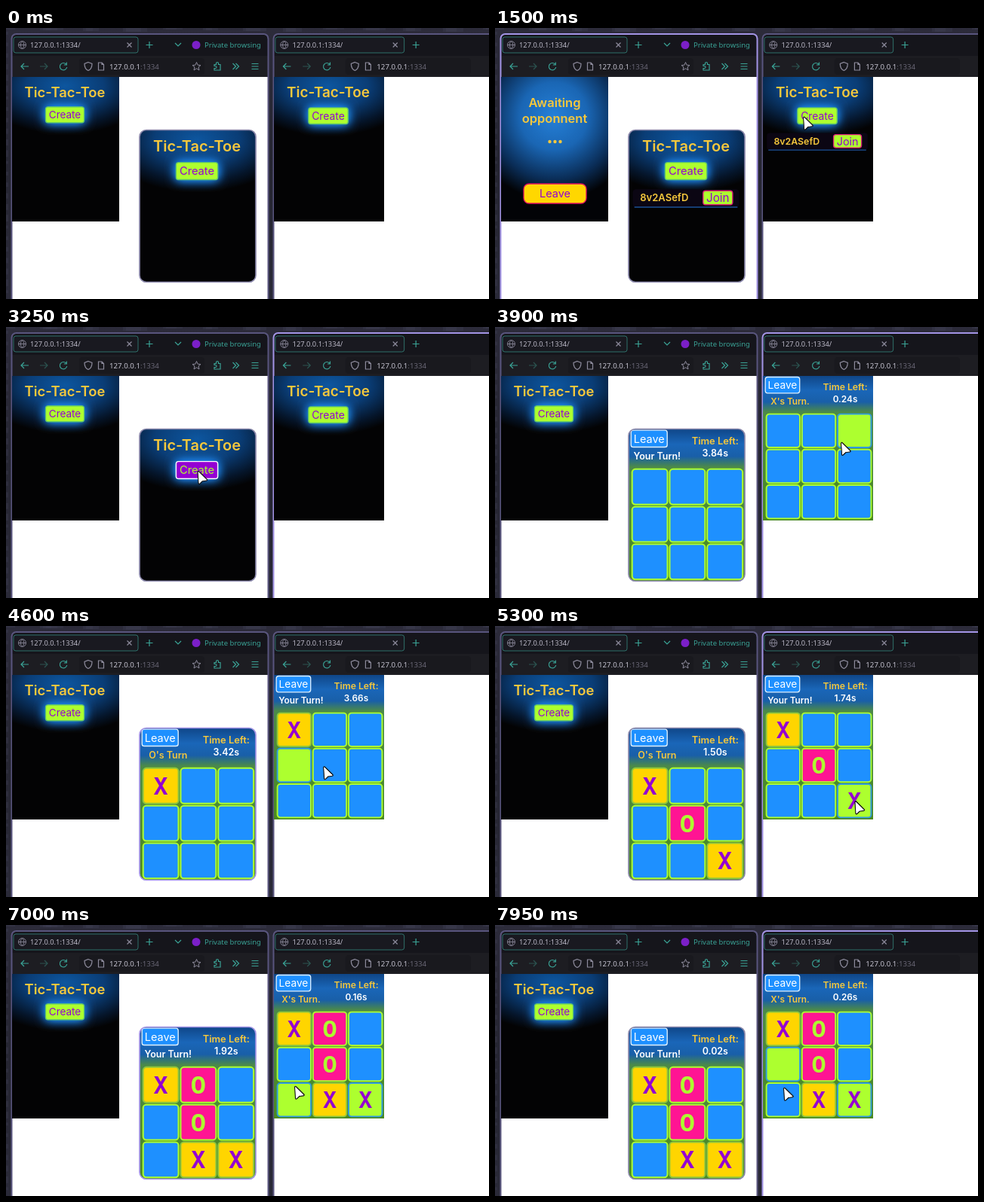
Write an HTML page with a canvas that moves like this. It is 640 px wide and 360 px high and loops after 8000 ms.

```html
<!DOCTYPE html>
<html lang="en">
<head>
<meta charset="utf-8">
<title>Tic-Tac-Toe</title>
<style>
html, body { margin: 0; width: 100%; height: 100%; overflow: hidden; background: #22222e; }
canvas { display: block; width: 640px; height: 360px; }
</style>
</head>
<body>
<canvas id="stage"></canvas>
<script>
const LOOP = 8000, TRAVEL = 350, PRESS = 100, HOVER_LAG = 50, NET_LAG = 120;
const GOLD = '#f6c83c', LIME = '#adff2f', BLUE = '#1e90ff', VIOLET = '#9400d3', TEAL = '#3aa396';
const LILAC = '#a394e6';
const UI = '"Noto Sans", sans-serif', GAME = 'Inter, sans-serif', MARK = '"Noto Sans Mono", monospace';
const CELL = 47.2;

const canvas = document.getElementById('stage');
const ctx = canvas.getContext('2d');
const dpr = window.devicePixelRatio || 1;
canvas.width = 640 * dpr;
canvas.height = 360 * dpr;

const PANELS = {
  left: { x: 8, y: 65, w: 142, h: 192 },
  right: { x: 355, y: 65, w: 146, h: 192 },
  popup: { x: 177, y: 135.5, w: 154, h: 202 }
};
const ROOM_IDS = { left: '8v2ASefD', popup: 'Kq4ZtW1m' };

// Pointer stops: arrival time, panel, target; "look" stops do not click
const STOPS = [
  [800, 'left', 'create'], [1550, 'right', 'create', 'look'], [1800, 'right', 'join'], [2450, 'right', 'leave'],
  [3255, 'popup', 'create'], [3720, 'right', 'join'],
  [4210, 'popup', 0], [4640, 'right', 4], [4950, 'popup', 8], [5200, 'right', 8],
  [5545, 'right', 1], [5860, 'popup', 7],
  [6600, 'right', 6, 'look'], [7200, 'right', 3], [8090, 'right', 6, 'look']
].map(([at, panel, target, look]) => ({ at, panel, target, click: !look, ...locate(panel, target) }));
STOPS.unshift({ at: 350, x: 330, y: 330 });

let now = 0, hover = null, state;

function view(name, playing) {
  const p = PANELS[name];
  if (!playing) return { x: p.x + p.w / 2 - 1, y: p.y, k: p.w / 142 };
  const k = p.w / 146;
  return { x: p.x + 3, y: p.y + 49 * k, k };
}

function locate(name, target) {
  const spots = { create: [0, 51], join: [39, 83], leave: [23, -37] };
  const [sx, sy] = spots[target] || [(target % 3 + 0.5) * CELL, (Math.floor(target / 3) + 0.5) * CELL];
  const v = view(name, !(target === 'create' || target === 'join'));
  return { x: v.x + sx * v.k, y: v.y + sy * v.k };
}

function pointer(t) {
  if (t < STOPS[0].at + PRESS) return null;
  const i = STOPS.findIndex(s => s.at > t);
  const a = STOPS[i - 1], b = STOPS[i];
  const start = Math.max(a.at + PRESS, b.at - TRAVEL);
  const u = Math.max(0, (t - start) / (b.at - start)), e = u * u * (3 - 2 * u);
  return { x: a.x + (b.x - a.x) * e, y: a.y + (b.y - a.y) * e };
}

// Replays every click up to time t
function simulate(t) {
  const s = { screen: { left: 'lobby', right: 'lobby', popup: 'lobby' }, host: null, board: [], moves: 0, denied: {}, since: 0 };
  for (const { at, panel, target, click } of STOPS) {
    if (!click || at > t) continue;
    s.focus = panel;
    const time = at + PRESS;
    if (time > t) continue;
    if (target === 'create') {
      s.host = panel;
      s.screen[panel] = 'wait';
    } else if (target === 'join') {
      s.screen[s.host] = s.screen[panel] = 'game';
      s.host = null;
      s.since = time;
    } else if (target === 'leave') {
      s.screen.left = s.screen.right = 'lobby';
    } else if (s.board[target]) {
      s.denied[panel + target] = true;
    } else if (panel === (turnOf(s) === 'X' ? 'popup' : 'right')) {
      s.board[target] = turnOf(s);
      s.moves++;
      s.since = time;
    }
  }
  return s;
}

const turnOf = s => Math.min(s.moves, 4) % 2 ? 'O' : 'X';

function timeLeft(t) {
  const s = simulate(t), limit = s.moves < 2 ? 4 : 2;
  return limit - ((t - s.since) / 500) % limit;
}

function isHot(x, y, w, h) {
  if (!hover) return false;
  const p = ctx.getTransform().inverse().transformPoint(new DOMPoint(hover.x * dpr, hover.y * dpr));
  return p.x > x && p.x < x + w && p.y > y && p.y < y + h;
}

function box(x, y, w, h, r, fill, stroke, width = 1) {
  ctx.beginPath();
  ctx.roundRect(x, y, w, h, r);
  if (fill) { ctx.fillStyle = fill; ctx.fill(); }
  if (stroke) { ctx.strokeStyle = stroke; ctx.lineWidth = width; ctx.stroke(); }
}

function dot(x, y, r, color) {
  ctx.fillStyle = color;
  ctx.beginPath();
  ctx.arc(x, y, r, 0, 7);
  ctx.fill();
}

function text(str, x, y, size, color, font = GAME, weight = 400, align = 'center') {
  ctx.font = `${weight} ${size}px ${font}`;
  ctx.textAlign = align;
  ctx.fillStyle = color;
  ctx.fillText(str, x, y);
}

function line(d, x, y, color = TEAL, width = 1.2) {
  ctx.save();
  ctx.translate(x, y);
  ctx.strokeStyle = color;
  ctx.lineWidth = width;
  ctx.stroke(new Path2D(d));
  ctx.restore();
}

function gradient(stops, ...area) {
  const g = area.length === 4 ? ctx.createLinearGradient(...area) : ctx.createRadialGradient(...area);
  stops.forEach(([at, color]) => g.addColorStop(at, color));
  return g;
}

function button(label, x, y, w, h, size, { fill = LIME, color = VIOLET, border, r = 3, glow }) {
  const hot = isHot(x, y, w, h);
  ctx.save();
  if (glow) { ctx.shadowColor = BLUE; ctx.shadowBlur = 14 * dpr; }
  box(x, y, w, h, r, hot ? VIOLET : fill);
  if (glow) ctx.fill();
  ctx.restore();
  box(x, y, w, h, r, null, hot ? '#fff' : border, 1.3);
  text(label, x + w / 2, y + h / 2 + size * 0.36, size, hot ? LIME : color);
}

function lobby() {
  ctx.fillStyle = '#030304';
  ctx.fillRect(-80, 0, 160, 200);
  ctx.save();
  ctx.scale(1.8, 1);
  ctx.fillStyle = gradient([[0, '#0d569f'], [0.45, '#0a3d76'], [0.8, '#05152a'], [1, '#05152a00']], 0, 12, 0, 0, 12, 64);
  ctx.fillRect(-80, 0, 160, 90);
  ctx.restore();
  text('Tic-Tac-Toe', 0, 26.6, 18.4, GOLD, GAME, 600);
  button('Create', -25.5, 39.8, 51, 21, 13.5, { border: '#5fc46a', glow: true });
  if (!state.host) return;
  box(-65, 72.5, 130, 22, 4, '#0b0613');
  line('M-63 94.5H63', 0, 0, '#1a5096', 1.3);
  text(ROOM_IDS[state.host], -56, 87.5, 12, GOLD, GAME, 600, 'left');
  button('Join', 21, 74.5, 36, 17, 14, { border: '#dc1e78' });
}

function waiting() {
  ctx.fillStyle = gradient([[0, '#2580d8'], [0.4, '#1a66b4'], [0.75, '#0a2d57'], [1, '#020306']], 0, 52, 0, 0, 52, 112);
  ctx.fillRect(-80, 0, 160, 205);
  text('Awaiting', 1, 40, 16.5, GOLD, GAME, 600);
  text('opponnent', 1, 61, 16.5, GOLD, GAME, 600);
  for (let i = -1; i < 2; i++) dot(1.5 + i * 7, 86, 2.2, GOLD);
  button('Leave', -40, 142, 83, 26, 14.5, { fill: '#ffd700', border: '#e01060', r: 7 });
}

function cellColors(mark, hot) {
  if (hot) return [LIME, '#2f9be0'];
  if (mark === 'X') return ['#ffd500', '#8fc63c'];
  return [mark ? '#ff1493' : BLUE, LIME];
}

function game(name) {
  const mine = name === 'right' ? 'O' : 'X', turn = turnOf(state), own = turn === mine;
  const left = timeLeft(name === 'right' ? Math.max(now - NET_LAG, state.since ? 0 : now) : now);

  ctx.fillStyle = gradient([[0, '#0f4688'], [0.1, '#1a66b8'], [0.18, '#195fa8'], [0.25, '#4c8a48'], [1, '#4a8a20']], 0, -49, 0, 143);
  ctx.fillRect(-4, -54, 154, 202);
  button('Leave', 0.2, -47.5, 45.5, 21.3, 13.7, { fill: BLUE, border: '#dff0ff', color: '#fff' });
  text('Time Left:', 106, -29.8, 12.2, GOLD, GAME, 600);
  text(left.toFixed(2) + 's', 106, -14.3, 11.8, '#fff', GAME, 600);
  const label = own ? 'Your Turn!' : `${turn}'s Turn${mine === 'O' ? '.' : ''}`;
  text(label, 33, -10.8, 11.8, own ? '#fff' : GOLD, GAME, 600);

  for (let i = 0; i < 9; i++) {
    const x = 1.6 + (i % 3) * CELL, y = 1.6 + Math.floor(i / 3) * CELL, size = CELL - 2.8;
    const mark = state.board[i];
    const [fill, border] = cellColors(mark, isHot(x, y, size, size) || state.denied[name + i]);
    box(x, y, size, size, 4, fill, border, 1.9);
    if (mark) text(mark, x + size / 2, y + 33.2, 31, mark === 'X' ? VIOLET : LIME, MARK, 600);
  }
}

function panel(name) {
  const p = PANELS[name], screen = state.screen[name], v = view(name, screen === 'game');
  ctx.save();
  ctx.beginPath();
  ctx.roundRect(p.x, p.y, p.w, p.h, name === 'popup' ? 9 : 0);
  ctx.clip();
  ctx.translate(v.x, v.y);
  ctx.scale(v.k, v.k);
  ({ lobby, wait: waiting, game })[screen](name);
  ctx.restore();
}

function browser(x, w, focused, at, full) {
  box(x, 8.5, w, 370, 6, '#fff');
  box(x, 8.5, w, 56.5, [6, 6, 0, 0], '#15151b');
  ctx.fillStyle = '#1d1d22';
  ctx.fillRect(x, 37, w, 28);
  const tab = at(10), shift = full ? 0 : 3;
  box(at(97) + shift, 40, 166, 22, 4, '#19191e');
  box(tab, 12, at(175) - tab, 21, 3, '#191920', '#2f716b');
  const gray = '#8d8b9c', dim = '#2c5450';
  line('M-5 0A5 5 0 1 0 5 0A5 5 0 1 0-5 0H5M0-5C-3-2-3 2 0 5C3 2 3-2 0-5', at(21.5), 22.5, gray, 0.9);
  text('127.0.0.1:1334/', at(32), 26, 9.3, '#bab8c6', UI, 400, 'left');
  line('M-3-3L3 3M3-3L-3 3', at(163.5), 22.5, gray);
  line('M-4.5 0H4.5M0-4.5V4.5', at(190), 22.5);
  line('M5 0H-5M-1-4L-5 0L-1 4', at(25), 51);
  line('M-5 0H5M1-4L5 0L1 4', at(50), 51, dim);
  line('M3.5-3A4.7 4.7 0 1 0 4.7 1M4.3-5.5V-2H.8', at(76), 51);
  line('M0-5.5L5-3.5C5 1 3.5 4 0 5.5C-3.5 4-5 1-5-3.5Z', at(109) + shift, 51, gray);
  line('M-3.5-5H1L3.5-2.5V5H-3.5ZM1-5V-2.5H3.5', at(126) + shift, 51, gray);
  text('127.0.0.1', at(137) + shift, 55, 9.7, '#c5c3d0', UI, 400, 'left');
  const host = ctx.measureText('127.0.0.1').width;
  text(':1334', at(137) + shift + host, 55, 9.7, '#686675', UI, 400, 'left');
  if (full) {
    line('M-4-2L0 2L4-2', 228, 22);
    dot(252, 22.5, 5.5, '#7b1fc8');
    text('Private browsing', 263, 26, 9.5, TEAL, UI, 400, 'left');
    line('M0-5.5L1.6-1.8L5.5-1.5L2.5 1L3.5 5L0 2.8L-3.5 5L-2.5 1L-5.5-1.5L-1.6-1.8Z', 252.5, 51, gray, 1);
    line('M-4-2.5H-1.5V-4A1.5 1.5 0 0 1 1.5-4V-2.5H4V5H-4V2.5H-2.5A1.5 1.5 0 0 0-2.5-.5H-4Z', 280, 51);
    line('M-4-4L0 0L-4 4M0-4L4 0L0 4', 304.5, 51);
    line('M-4.5-3.5H4.5M-4.5 0H4.5M-4.5 3.5H4.5', 330, 51);
  }
  box(x - 0.5, 8, w + 1, 371, 6, null, focused ? LILAC : '#59557e', 2);
}

function wallpaper() {
  ctx.fillStyle = gradient([[0, '#2c2b3a'], [0.5, '#252531'], [1, '#2a2a38']], 0, 0, 0, 360);
  ctx.fillRect(0, 0, 640, 360);
  ctx.fillStyle = '#45445a44';
  for (let i = 0; i < 26; i++) {
    ctx.fillRect(0, 5 + i * 14.3, 3 + (i * 5) % 5, 4 + (i * 7) % 6);
    ctx.fillRect((i * 53) % 640, 0, 12 + (i * 11) % 17, 2 + i % 4);
  }
}

function arrow(p) {
  ctx.save();
  ctx.translate(p.x + 2, p.y + 2);
  ctx.scale(0.82, 0.82);
  const shape = new Path2D('M0 0L1.2 18L5.8 13.6L12.8 12.6Z');
  ctx.lineJoin = 'round';
  ctx.strokeStyle = '#111';
  ctx.lineWidth = 4;
  ctx.stroke(shape);
  ctx.strokeStyle = ctx.fillStyle = '#fff';
  ctx.lineWidth = 1.2;
  ctx.stroke(shape);
  ctx.fill(shape);
  ctx.restore();
}

function draw(t) {
  now = t;
  state = simulate(t);
  hover = pointer(t - HOVER_LAG);
  ctx.setTransform(dpr, 0, 0, dpr, 0, 0);
  wallpaper();
  browser(8, 339, state.focus === 'left', x => x, true);
  browser(355, 300, state.focus === 'right', x => 346.5 + x * 1.035, false);
  Object.keys(PANELS).forEach(panel);
  const p = PANELS.popup;
  box(p.x, p.y, p.w, p.h, 9, null, state.focus === 'popup' ? LILAC : '#8b88ab', 1.7);
  const at = pointer(t);
  if (at) arrow(at);
}

let origin;
function tick(time) {
  origin ??= time;
  draw((time - origin) % LOOP);
  requestAnimationFrame(tick);
}
requestAnimationFrame(tick);
</script>
</body>
</html>
```
